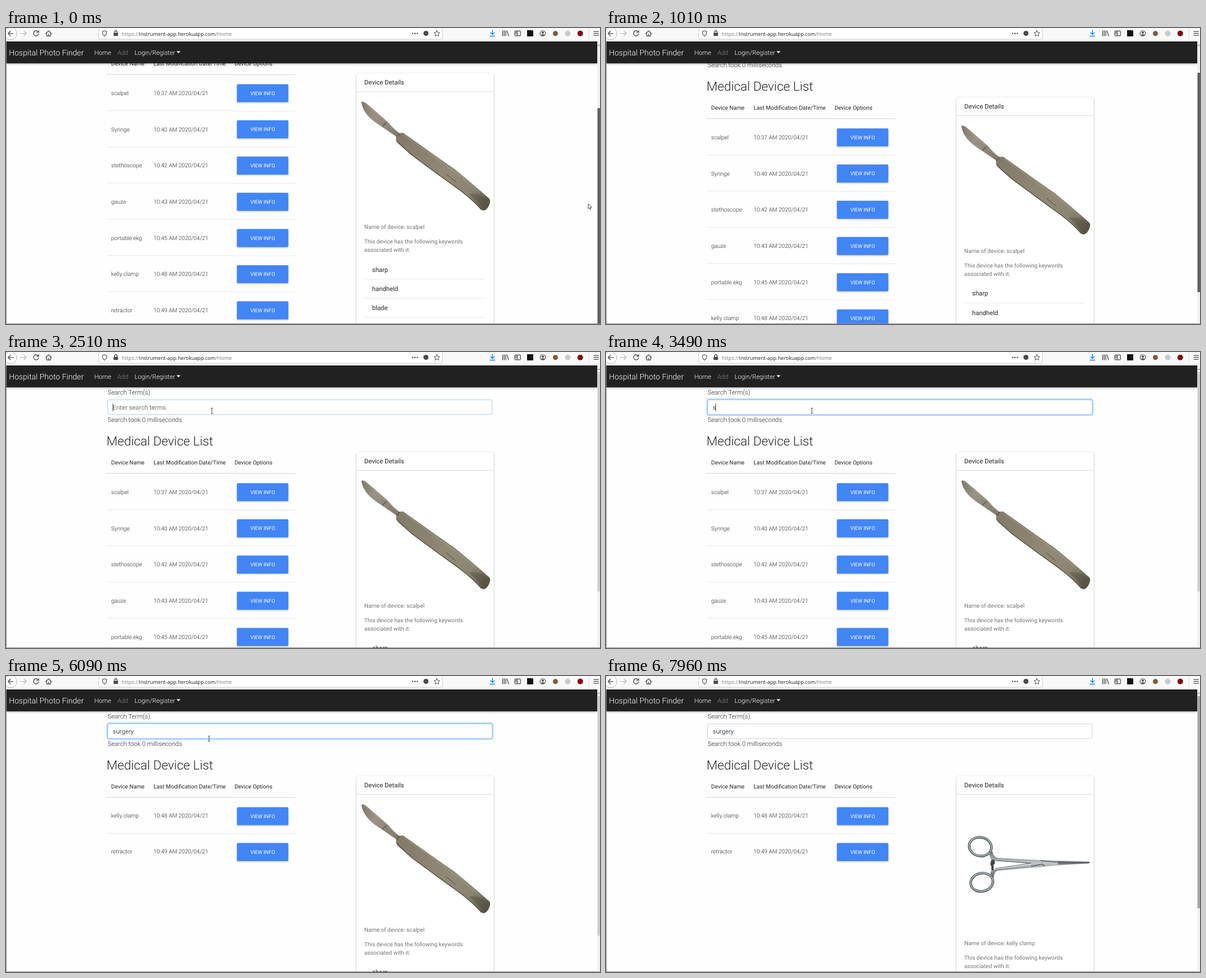
Recreate the animation shown at these times as an HTML page. Size 1059x529 px, loop 8000 ms.

```html
<!DOCTYPE html>
<html lang="en">
<head>
<meta charset="utf-8">
<title>Device list</title>
<style>
  html, body { margin: 0; width: 100%; height: 100%; overflow: hidden; background: #fff; }
  svg { display: block; width: 1059px; height: 529px; text-rendering: geometricPrecision; }
  text { font-family: Roboto, sans-serif; fill: #212529; white-space: pre; }
  .light { font-weight: 300; }
  .body { font-size: 11.3px; }
  .small { font-size: 10.15px; }
  .muted { fill: #747373; }
  .button { fill: #4285f4; filter: drop-shadow(0 1.5px 1.5px rgba(0,0,0,.26)); }
  .label { fill: #fff; font-size: 9.15px; text-anchor: middle; }
  .rule { stroke: #dee2e6; stroke-width: .8; }
  .icon { fill: none; stroke: #4a4a4f; stroke-width: 1.3; stroke-linecap: round; stroke-linejoin: round; }
</style>
</head>
<body>
<svg viewBox="0 0 1059 529">
  <defs>
    <linearGradient id="steel" gradientUnits="userSpaceOnUse" x1="633" y1="230" x2="862" y2="415">
      <stop offset="0" stop-color="#7d776a"/><stop offset=".12" stop-color="#9a9386"/>
      <stop offset=".3" stop-color="#827a69"/><stop offset=".7" stop-color="#918a76"/>
      <stop offset=".86" stop-color="#8b8472"/><stop offset="1" stop-color="#575142"/>
    </linearGradient>
    <linearGradient id="chrome" x1="0" y1="0" x2="0" y2="1">
      <stop offset="0" stop-color="#687174"/><stop offset=".45" stop-color="#c0c6c7"/>
      <stop offset="1" stop-color="#596265"/>
    </linearGradient>
  </defs>

  <rect width="1059" height="529" fill="#fefefe"/>
  <g id="page">
    <text x="181.2" y="75.5" class="light body">Search Term(s)</text>
    <rect id="glow" x="179.9" y="83.9" width="688.2" height="29.2" rx="4" fill="none" stroke="#007bff" stroke-opacity=".27" stroke-width="2.3"/>
    <rect id="field" x="181.4" y="85.4" width="685.4" height="26.4" rx="2.8" fill="#fff"/>
    <text id="hint" x="190.3" y="102.8" class="body" style="fill:#6c757d">Enter search terms</text>
    <text id="typed" x="190.3" y="102.8" class="body" style="fill:#495057"></text>
    <rect id="caret" y="92" width="1" height="14" fill="#495057"/>
    <text x="181.2" y="124.5" class="light body">Search took 0 milliseconds</text>
    <text x="179.2" y="167" class="light" font-size="22.6">Medical Device List</text>
    <g class="small">
      <text x="187.5" y="201.1">Device Name</text>
      <text x="263.1" y="201.1">Last Modification Date/Time</text>
      <text x="407.4" y="201.1">Device Options</text>
    </g>
    <rect id="hover" x="179" y="217" width="337" height="64" fill="#ebebeb"/>
    <path d="M179 216.8H400M400 217.3H516" stroke="#dee2e6" stroke-width="1.5"/>
    <g id="all"></g>
    <g id="matches"></g>
  </g>

  <g id="card">
    <rect x="625" y="178.8" width="244.5" height="480" rx="2.5" fill="#fff" style="filter:drop-shadow(0 1.3px 1.6px rgba(0,0,0,.32))"/>
    <path d="M625 211.6H869.5" stroke="#d9d9d9"/>
    <text x="638.8" y="198.8" class="body">Device Details</text>
    <g id="scalpel">
      <path d="M633.5 230Q637 228 643 233L671 257L682 267Q690 277 701 285.5L708 285Q735 304 760 322L800 350Q834 378 862 403Q865 408 860 417Q856 424 851 424Q846 422 840 414Q830 404 810 389L770 360L724 326L699 304Q694 299 696 292L680 281L658 266Q636 250 633.5 230Z" fill="url(#steel)"/>
      <path d="M671 274L679 266M696 293L702 286M696 298Q700 304 724 325L770 359L810 388Q832 405 848 423" fill="none" stroke="#575142" stroke-width="1.3"/>
      <path d="M637 231L672 260L695 282M710 289L758 324L800 355L846 393" fill="none" stroke="#aaa38f" stroke-width="1" opacity=".8"/>
      <path d="M785 359L802 373" stroke="#655e4e" stroke-width="1.2"/>
      <path d="M825 394Q840 391 860 404Q861 412 852 422Q845 411 825 394Z" fill="#4e493c" opacity=".4"/>
    </g>
    <g id="clamp">
      <g fill="none" stroke="#586164" stroke-width="4.6">
        <ellipse cx="667.3" cy="305" rx="20" ry="16.7" transform="rotate(12 667.3 305)"/>
        <ellipse cx="670" cy="368.7" rx="20" ry="16.2" transform="rotate(-12 670 368.7)"/>
      </g>
      <g fill="none" stroke="#bfc5c6" stroke-width="1.5">
        <ellipse cx="667.3" cy="304.7" rx="20" ry="16.7" transform="rotate(12 667.3 305)"/>
        <ellipse cx="670" cy="368.4" rx="20" ry="16.2" transform="rotate(-12 670 368.7)"/>
      </g>
      <path d="M683 315L689 313Q690 323 699 325L775 329L862 331.5Q864 333.5 861 335L800 339L778 341L698 348Q692 350 691 361L686 357Q684 350 689 346L760 336L688 329Q684 325 683 315Z" fill="url(#chrome)"/>
      <path d="M687 328.5H693V336L691 337V347H687V340L685.5 338V334Z" fill="#3f4749"/>
      <path d="M694 330L758 334.5L694 344" fill="none" stroke="#535d60" stroke-width="1"/>
      <path d="M775 330L806 333L862 333.5M758 340L778 336L782 340" fill="none" stroke="#353e41" stroke-width="1.1"/>
      <path d="M806 331L862 332.2L861 335L806 337Z" fill="#535b5e" opacity=".75"/>
    </g>
    <g id="details">
      <text id="deviceName" x="638.8" y="456.7" class="small muted"></text>
      <text x="638.8" y="482.9" class="small muted">This device has the following keywords</text>
      <text x="638.8" y="498" class="small muted">associated with it:</text>
      <g id="keywords"></g>
    </g>
  </g>

  <rect y="24" width="1054.5" height="39.2" fill="#212121" style="filter:drop-shadow(0 1.5px 2px rgba(0,0,0,.3))"/>
  <text x="5.2" y="48.6" class="light" font-size="14.1" style="fill:#fff">Hospital Photo Finder</text>
  <g class="light body">
    <text x="157.4" y="47.5" style="fill:#fff">Home</text>
    <text x="198.4" y="47.5" style="fill:#858585">Add</text>
    <text x="229" y="47.5" style="fill:#fff">Login/Register</text>
  </g>
  <path d="M304 41.5H311L307.5 45.3Z" fill="#fff"/>

  <rect x="1054.3" y="24" width="4.7" height="505" fill="#f0f0f0"/>
  <path d="M1055.4 32L1057 30L1058.6 32" fill="none" stroke="#606060" stroke-width=".9"/>
  <rect id="thumb" x="1054.5" width="4.5"/>

  <rect width="1059" height="24" fill="#f9f9fa"/>
  <rect x="165.5" y="-5" width="612.5" height="25" rx="1.5" fill="#fff" stroke="#ccc"/>
  <circle cx="8" cy="10" r="11" fill="#fff" stroke="#b5b5b8"/>
  <g class="icon">
    <path d="M13 9.8H4M8 5.5L3.7 9.8L8 14"/>
    <path d="M26 9.8H36M32 5.5L36.3 9.8L32 14" stroke="#bcbcbf"/>
    <path d="M57.6 7.2A4.5 4.5 0 1 0 58 11M58.3 4.5V7.7H55"/>
    <path d="M70.8 10L76 5L81.2 10M72.5 9.5V14.3H79.5V9.5M76 14V11"/>
    <path d="M175.7 5L179.5 6.3Q179.7 12 175.7 14.5Q171.7 12 171.9 6.3Z" stroke-width="1.1"/>
    <path d="M193.5 9V7.3A2.3 2.3 0 0 1 198.1 7.3V9"/>
    <path d="M768.2 4.6L769.8 8L773.4 8.4L770.7 10.9L771.5 14.5L768.2 12.7L764.9 14.5L765.7 10.9L763 8.4L766.6 8Z" stroke-width="1"/>
    <path d="M867.3 4V11M864 8.3L867.3 11.5L870.6 8.3M863.2 14.6H871.5" stroke="#0a84ff" stroke-width="1.5"/>
    <path d="M885.5 5V14M888.3 5V14M891 5V14M893.3 5.3L896 14"/>
    <rect x="907.2" y="5.3" width="10" height="8.5" rx="1.2"/>
    <path d="M911.5 5.5V13.5M908.8 7.7H910M908.8 9.7H910"/>
    <circle cx="957" cy="9.5" r="4.8" stroke-width="1.1"/>
    <path d="M1048 6.3H1056.5M1048 9.7H1056.5M1048 13.1H1056.5"/>
  </g>
  <rect x="191.8" y="8.5" width="8" height="5.8" rx="1" fill="#4a4a4f"/>
  <g fill="#4a4a4f">
    <circle cx="725" cy="9.7" r="1.3"/><circle cx="729.2" cy="9.7" r="1.3"/><circle cx="733.4" cy="9.7" r="1.3"/>
    <circle cx="957" cy="8.2" r="2"/><path d="M953.5 12.4Q957 9.4 960.5 12.4Q957 15.2 953.5 12.4Z"/>
    <circle cx="748.7" cy="9.5" r="4.5"/>
  </g>
  <rect x="929" y="4" width="11" height="11" fill="#111"/>
  <circle cx="979.5" cy="9.7" r="4.5" fill="#7b5a3c"/>
  <circle cx="1001.5" cy="9.7" r="5" fill="#c9c9cb"/>
  <circle cx="1023.8" cy="9.7" r="5" fill="#800610"/>
  <path d="M1039.5 0V20" stroke="#dedee0"/>
  <text x="206.6" y="13.6" style="font:9.1px 'Open Sans',sans-serif;fill:#77777b">https://<tspan fill="#1c1c20">instrument-app.herokuapp.com</tspan>/Home</text>
  <path d="M.5 24V528.5H1059" fill="none" stroke="#8c8c8c"/>

  <g id="pointer">
    <path id="arrow" d="M0 0V9L2.1 7.2L3.5 10.3L4.9 9.7L3.5 6.7H6.4Z" fill="#fff" stroke="#222" stroke-width=".8"/>
    <path id="beam" d="M-2 -4.7H-.5L0 -4.2L.5 -4.7H2M0 -4.2V4.2M-2 4.7H-.5L0 4.2L.5 4.7H2" fill="none" stroke="#333" stroke-width=".9"/>
    <path id="hand" d="M-1 1Q0 -1 1 1V4L4.5 5Q5.5 5.5 5 8L4 11H-.5L-3.4 7Q-3.2 5.5 -1 7Z" fill="#fff" stroke="#222" stroke-width=".8"/>
  </g>
</svg>

<script>
const LOOP = 8000;
const $ = id => document.getElementById(id);
const show = (id, on) => $(id).style.display = on ? '' : 'none';

const devices = [
  ['scalpel', 37], ['Syringe', 40], ['stethoscope', 42], ['gauze', 43],
  ['portable ekg', 45], ['kelly clamp', 48], ['retractor', 49]
];

const tableRows = (list, pitch, baseline) => list.map(([name, minute], i) => {
  const top = 217.5 + i * pitch, end = top + pitch;
  return `<text x="187.5" y="${top + baseline}" class="light small">${name}</text>
    <text x="263.1" y="${top + baseline}" class="light small">10:${minute} AM 2020/04/21</text>
    <rect x="411.7" y="${top + 16.9}" width="91.6" height="32.2" rx="1.6" class="button"/>
    <text x="457.6" y="${top + 36.2}" class="label">VIEW INFO</text>
    ${i < list.length - 1 ? `<path d="M179 ${end - .5}H400M400 ${end}H516" class="rule"/>` : ''}`;
}).join('');

$('all').innerHTML = tableRows(devices, 64.7, 36.3);
$('matches').innerHTML = tableRows(devices.slice(5), 64.1, 35.7);
$('keywords').innerHTML = ['sharp', 'handheld', 'blade'].map((word, i) =>
  `<text x="652.8" y="${533.4 + i * 34.1}" class="body">${word}</text>
   <path d="M639 ${546.6 + i * 34.1}H856" class="rule"/>`).join('');

// Each step changes part of the state and holds until the next one.
const arrow = (x, y) => ({ pointer: 'arrow', x, y });
const beam = (x, y) => ({ pointer: 'beam', x, y });
const type = typed => ({ typed, caret: true });
const gone = { pointer: '' };
const steps = [
  [0, { scroll: 134, thumb: '#606060', thumbSize: 392, typed: '', caret: false, focus: 0,
        filtered: false, hover: false, clamp: false, ...arrow(1038, 314) }],
  [150, { scroll: 132, ...arrow(1050, 311) }],
  [290, { scroll: 128, ...gone }],
  [430, { scroll: 121 }],
  [580, { scroll: 110 }],
  [720, { scroll: 95 }],
  [870, { scroll: 76 }],
  [1010, { scroll: 55 }],
  [1160, { scroll: 25 }],
  [1280, { scroll: 0 }],
  [1540, { thumb: '#cdcdcd', ...arrow(1020, 205) }],
  [1680, arrow(880, 180)],
  [1820, arrow(690, 152)],
  [1960, arrow(510, 126)],
  [2090, beam(405, 108)],
  [2220, beam(367, 105)],
  [2510, { focus: 1, caret: true }],
  [2630, { focus: 2 }],
  [3050, { caret: false }],
  [3490, type('s')],
  [3760, { ...type('su'), filtered: true, thumbSize: 428 }],
  [4310, type('sur')],
  [4590, type('surg')],
  [4990, type('surge')],
  [5110, type('surger')],
  [5540, type('surgery')],
  [6090, { caret: false, ...beam(362, 112) }],
  [6220, arrow(352, 135)],
  [6350, arrow(342, 162)],
  [6480, { focus: 1, ...arrow(333, 184) }],
  [6600, { focus: 0, ...arrow(322, 206) }],
  [6730, { hover: true, ...beam(311, 229) }],
  [6860, beam(301, 247)],
  [6980, beam(296, 255)],
  [7120, { clamp: true, thumbSize: 379, pointer: 'hand', x: 440, y: 251 }],
  [7270, { pointer: 'hand', x: 488, y: 246 }],
  [7440, { hover: false, ...arrow(640, 226) }],
  [7610, arrow(835, 208)],
  [7790, arrow(1020, 196)],
  [7960, { thumb: '#a6a6a6', ...gone }]
];

function render(time) {
  const s = Object.assign({}, ...steps.filter(([at]) => at <= time).map(step => step[1]));
  $('page').setAttribute('transform', `translate(0 ${-s.scroll})`);
  $('card').setAttribute('transform', `translate(0 ${-Math.min(s.scroll, 97.7)})`);
  $('thumb').setAttribute('y', 36 + s.scroll * .8);
  $('thumb').setAttribute('height', s.thumbSize);
  $('thumb').setAttribute('fill', s.thumb);

  $('typed').textContent = s.typed;
  show('hint', !s.typed);
  show('caret', s.caret);
  $('caret').setAttribute('x', 190 + (s.typed ? $('typed').getComputedTextLength() - .8 : 0));
  show('glow', s.focus === 2);
  $('field').setAttribute('stroke', ['#ced4da', '#a9cbed', '#80bdff'][s.focus]);

  show('hover', s.hover);
  show('all', !s.filtered);
  show('matches', s.filtered);
  show('scalpel', !s.clamp);
  show('clamp', s.clamp);
  show('keywords', !s.clamp);
  $('details').setAttribute('transform', `translate(0 ${s.clamp ? 24 : 0})`);
  $('deviceName').textContent = 'Name of device: ' + (s.clamp ? 'kelly clamp' : 'scalpel');

  for (const kind of ['arrow', 'beam', 'hand']) show(kind, s.pointer === kind);
  $('pointer').setAttribute('transform', `translate(${s.x} ${s.y})`);
}

const start = performance.now();
function tick() {
  render((performance.now() - start) % LOOP);
  requestAnimationFrame(tick);
}
tick();
</script>
</body>
</html>
```
